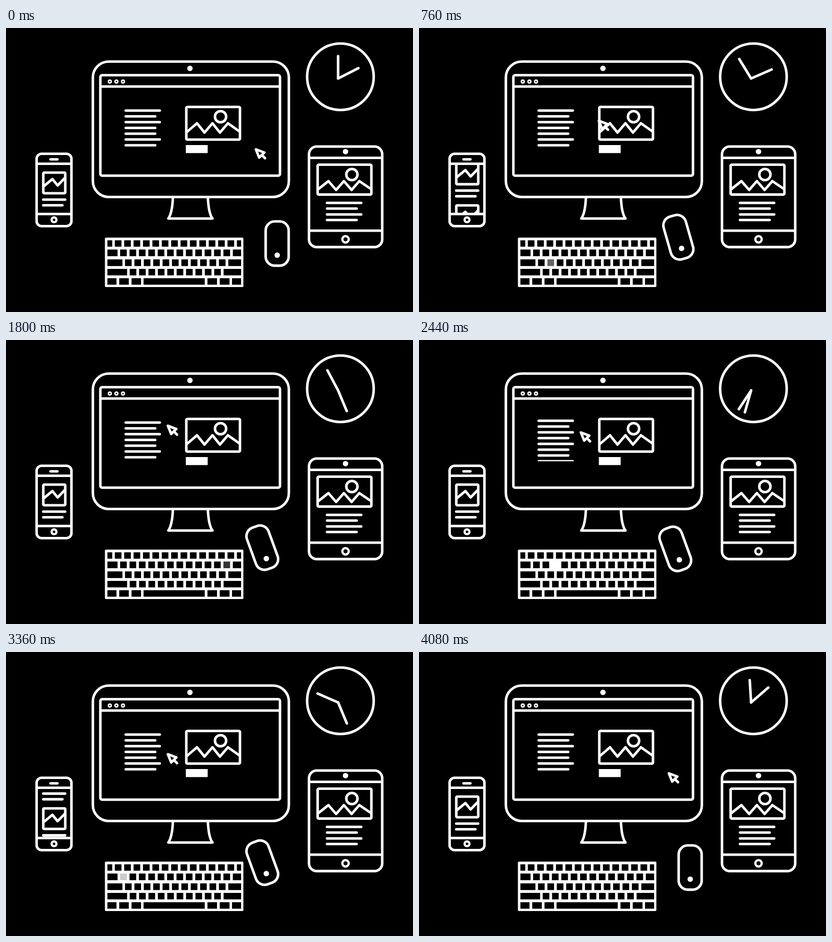
Write an HTML page that moves like this. It is 895 by 626 pixels and loops after 4.12 s.

```html
<!DOCTYPE html>
<html lang="en">
<head>
<meta charset="utf-8">
<title>Devices</title>
<style>
  html, body { margin: 0; width: 100%; height: 100%; overflow: hidden; background: #000; }
  svg { display: block; width: 100%; height: 100%; }
  .line { fill: none; stroke: #fff; stroke-width: 5.6; stroke-linecap: round; stroke-linejoin: round; }
  .solid { fill: #fff; stroke: none; }
</style>
</head>
<body>
<svg viewBox="0 0 895 626" class="line">
  <defs>
    <clipPath id="textClip"><rect x="250" y="173" width="100" height="94.3"/></clipPath>
    <clipPath id="phoneClip"><rect x="70" y="302" width="72" height="107"/></clipPath>
    <g id="phonePage">
      <rect x="82" y="318.8" width="48.3" height="45.4" rx="2"/>
      <path d="M84 348L102 333L113.5 347L129 331M82 378.2H130M82 390.7H124"/>
    </g>
  </defs>

  <g id="monitor">
    <rect x="191" y="74" width="431" height="298.5" rx="35"/>
    <circle class="solid" cx="404.5" cy="89" r="6"/>
    <rect x="207.5" y="104" width="395" height="221.5" rx="4"/>
    <path d="M208 129H602"/>
    <g stroke-width="3.2">
      <circle cx="228.3" cy="118" r="3.2"/>
      <circle cx="242.8" cy="118" r="3.2"/>
      <circle cx="257.3" cy="118" r="3.2"/>
    </g>
    <path d="M367 374C366 398 362.5 412 357 420H454C448 412 445 398 444 374"/>
    <rect x="396.5" y="174" width="118" height="72" rx="2.5"/>
    <circle cx="471.8" cy="195.5" r="12.3"/>
    <path d="M398 229L420 210L436.5 230.5L454 210L470.5 230.5L488 210L514 228.5"/>
    <rect class="solid" x="395.5" y="258" width="48" height="17.7"/>
    <g clip-path="url(#textClip)"><g id="text"></g></g>
  </g>

  <g id="phone">
    <g clip-path="url(#phoneClip)">
      <g id="feed"><use href="#phonePage"/><use href="#phonePage" y="92"/></g>
    </g>
    <rect x="67.3" y="277.3" width="76.6" height="159.4" rx="11"/>
    <path d="M68 299.3H143M68 410H143M98 289.5H113"/>
    <circle cx="105.6" cy="422.8" r="5.3" stroke-width="5"/>
  </g>

  <g id="tablet">
    <rect x="666.3" y="261.3" width="161" height="221.6" rx="17"/>
    <path d="M667 286.2H827M667 446.7H827"/>
    <circle class="solid" cx="746.6" cy="272.6" r="6"/>
    <circle cx="746.6" cy="465.7" r="7" stroke-width="5"/>
    <rect x="685.3" y="301.3" width="118.2" height="65.8" rx="2.5"/>
    <circle cx="760.6" cy="323" r="12.3"/>
    <path d="M687 355L709 337.5L726 357L743 337.5L760 357L777 337.5L802 354.5"/>
    <path d="M706 385.5H781M706 398H771M706 411H781M706 423.2H771"/>
  </g>

  <g id="clock">
    <circle cx="735.4" cy="107.5" r="73.2"/>
    <path id="hourHand" d="M730.3 111.2V62"/>
    <path id="minuteHand" d="M730.3 111.2V61.2"/>
  </g>

  <g id="keyboard">
    <rect class="solid" x="217.5" y="462" width="304.5" height="109" rx="2.5"/>
  </g>

  <g id="mouse">
    <rect x="571" y="426.3" width="50.6" height="97.6" rx="20"/>
    <circle class="solid" cx="596.4" cy="500.7" r="6"/>
  </g>

  <path id="cursor" d="M549.5 267.5L568 274.5L556.8 285.5ZM562.5 279.8L569.5 287"/>
</svg>

<script>
const LOOP = 4120, STEP = 40;
const LINE_GAP = 12.75, TEXT_PERIOD = 7 * LINE_GAP, PAGE_PERIOD = 92;
const KEY_PITCH = 20.65, KEY_WIDTH = 14.6, KEYS_LEFT = 223, KEYS_RIGHT = 517, KEY_RAMP = 200;

const byId = id => document.getElementById(id);

function add(parent, tag, attrs) {
  const node = document.createElementNS("http://www.w3.org/2000/svg", tag);
  for (const name in attrs) node.setAttribute(name, attrs[name]);
  return parent.appendChild(node);
}

// Two copies of the paragraph, so it can wrap around while scrolling.
const longLines = [0, 2, 5];
for (let i = -7; i < 7; i++) {
  const right = longLines.includes((i + 7) % 7) ? 338 : 328;
  add(byId("text"), "path", { d: `M263.3 ${182 + i * LINE_GAP}H${right}` });
}

function addKey(left, right, top, height) {
  return add(byId("keyboard"), "rect",
    { x: left, y: top, width: right - left, height, fill: "#000", stroke: "none" });
}

const rows = [
  { top: 468, height: 14, first: 239.3, count: 13 },
  { top: 488.3, height: 14.7, first: 251, count: 12 },
  { top: 510, height: 14.7, first: 261.7, count: 11 },
  { top: 531, height: 14.3, first: 272, count: 10 }
].map(({ top, height, first, count }) => {
  addKey(KEYS_LEFT, first - 5.7, top, height);
  addKey(first + count * KEY_PITCH, KEYS_RIGHT, top, height);
  return Array.from({ length: count }, (_, i) => {
    const left = first + i * KEY_PITCH;
    return addKey(left, left + KEY_WIDTH, top, height);
  });
});
[[223, 243], [249, 270], [276, 297], [302.5, 437], [443, 464], [470, 491.5], [497, 517]]
  .forEach(([left, right]) => addKey(left, right, 551.5, 14.3));

// peak time, row, column
const presses = [
  [440, 3, 4], [880, 2, 1], [1240, 3, 7], [1640, 1, 11],
  [2040, 3, 2], [2440, 1, 2], [2840, 2, 7], [3320, 1, 0]
].map(([peak, row, col]) => ({ peak, key: rows[row][col] }));

function ease(t, start, duration) {
  const p = Math.min(1, Math.max(0, (t - start) / duration));
  return p < 0.5 ? 2 * p * p : 1 - 2 * (1 - p) ** 2;
}

function setTransform(id, value) {
  byId(id).setAttribute("transform", value);
}

function render(t) {
  const turn = 360 * t / LOOP;
  setTransform("hourHand", `rotate(${turn} 730.3 111.2)`);
  setTransform("minuteHand", `rotate(${63 + 4 * turn} 730.3 111.2)`);

  const away = ease(t, 80, 1000) - ease(t, 3400, 630);
  const drift = ease(t, 1640, 1760) * (1 - ease(t, 3400, 630));
  setTransform("cursor", `translate(${-193.5 * away} ${-79 * away + 37 * drift})`);
  setTransform("mouse",
    `translate(${-32.7 * away} ${-17.5 * away + 6.7 * drift}) rotate(${-20 * away} 596.4 475.1)`);

  setTransform("text", `translate(0 ${TEXT_PERIOD * ease(t, 2080, 1036)})`);
  const pages = (ease(t, 445, 960) + ease(t, 2760, 960)) % 1;
  setTransform("feed", `translate(0 ${-PAGE_PERIOD * pages})`);

  for (const { peak, key } of presses) {
    const level = Math.round(255 * Math.max(0, 1 - Math.abs(t - peak) / KEY_RAMP));
    key.setAttribute("fill", `rgb(${level},${level},${level})`);
  }
}

const startTime = performance.now();
function tick() {
  const t = (performance.now() - startTime) % LOOP;
  render(Math.floor(t / STEP) * STEP);
  requestAnimationFrame(tick);
}
tick();
</script>
</body>
</html>
```
